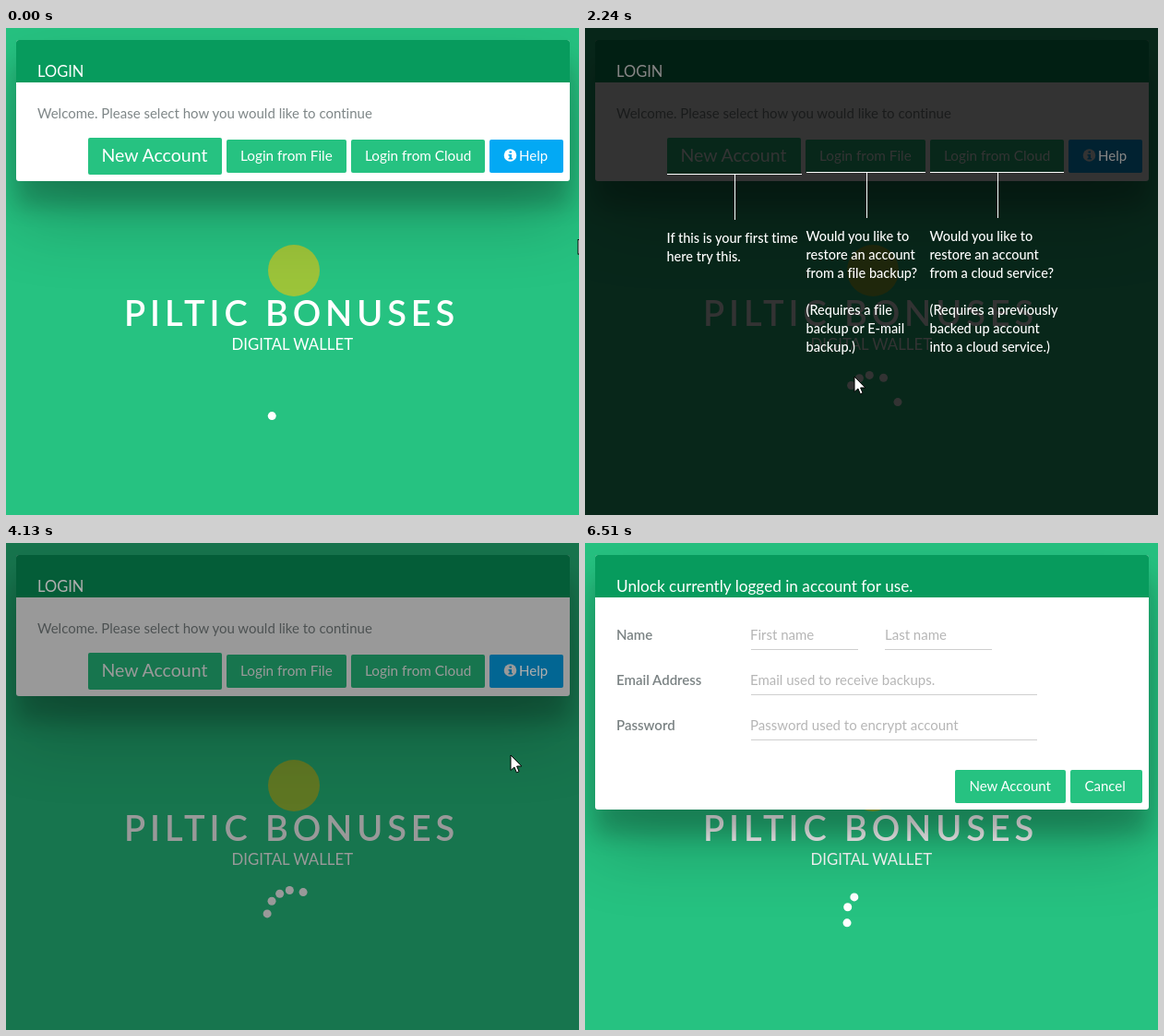
These frames come from a looping animation (621x528 px, 6650 ms). An HTML page:

```html
<!DOCTYPE html>
<html lang="en">
<head>
<meta charset="utf-8">
<title>Digital wallet login</title>
<style>
  html, body { margin: 0; width: 100%; height: 100%; overflow: hidden; background: #26c281; }
  body { position: relative; font: 15px Lato, "Open Sans", sans-serif; font-variant-ligatures: none; }
  svg, #dim { position: absolute; left: 0; top: 0; width: 621px; height: 528px; }
  text { fill: #fff; white-space: pre; }
  .card {
    position: absolute; left: 11px; top: 13px; width: 600px; border-radius: 3px; background: #fff;
    box-shadow: 0 27px 24px rgba(0,0,0,.2), 0 40px 77px rgba(0,0,0,.22);
  }
  .card svg { left: -11px; top: -13px; }
  .head { fill: #079b5d; }
  .btn rect { fill: #26c281; rx: 2px; }
  .btn #help { fill: #03a9f4; }
  .label text { fill: #7a8283; font-weight: 600; }
  .hint text { fill: #b6b6b6; }
  .rule { stroke: #cfcfcf; }
  #dim { background: #000; }
  #tips { font-size: 14.5px; font-weight: 500; }
  #tips path { stroke: #fff; fill: none; }
  .pointer { fill: #fff; stroke: #000; stroke-width: 1; }
</style>
</head>
<body>
<svg>
  <circle cx="312" cy="263" r="28" fill="#9cc43a"/>
  <text x="128" y="323" font-size="38" font-weight="600" letter-spacing="4.9">PILTIC BONUSES</text>
  <text x="244.5" y="349" font-size="16.8">DIGITAL WALLET</text>
  <g id="dots" fill="#fff"></g>
</svg>

<div class="card" id="login" style="height:153px"><svg>
  <path class="head" d="M11 59V16q0-3 3-3H608q3 0 3 3V59Z"/>
  <text x="34" y="53" font-size="16.5">LOGIN</text>
  <text x="34" y="98" style="fill:#7f8788">Welcome. Please select how you would like to continue</text>
  <g class="btn">
    <rect x="89" y="119" width="145" height="40"/><text x="103.5" y="145" font-size="19.5">New Account</text>
    <rect x="239" y="121" width="130" height="36"/><text x="254" y="144" font-size="15.3">Login from File</text>
    <rect x="374" y="121" width="145" height="36"/><text x="389" y="144" font-size="15.3">Login from Cloud</text>
    <rect x="524" y="121" width="80" height="36" id="help"/><text x="556" y="144">Help</text>
  </g>
  <circle cx="546.5" cy="138" r="6.8" fill="#fff"/>
  <path d="M545.5 133.5h2.5v2h-2.5zM544.5 137h3.5v4h1v1.5h-4.5v-1.5h1v-2.5h-1z" fill="#03a9f4"/>
</svg></div>

<div class="card" id="form" style="height:276px"><svg>
  <path class="head" d="M11 59V16q0-3 3-3H608q3 0 3 3V59Z"/>
  <text x="34" y="53" font-size="17.2">Unlock currently logged in account for use.</text>
  <g class="label">
    <text x="34" y="105">Name</text>
    <text x="34" y="154">Email Address</text>
    <text x="34" y="203">Password</text>
  </g>
  <g class="hint">
    <text x="179" y="105">First name</text>
    <text x="325" y="105">Last name</text>
    <text x="179" y="154">Email used to receive backups.</text>
    <text x="179" y="203">Password used to encrypt account</text>
  </g>
  <path class="rule" d="M180 115.5H296M325 115.5H441M180 164.5H490M180 213.5H490"/>
  <g class="btn">
    <rect x="401" y="246" width="120" height="36"/><text x="416.5" y="269">New Account</text>
    <rect x="526" y="246" width="78" height="36"/><text x="541.5" y="269">Cancel</text>
  </g>
</svg></div>

<div id="dim"></div>
<svg id="glow">
  <text x="34" y="53" font-size="16.5">LOGIN</text>
  <text x="556" y="144">Help</text>
</svg>
<svg id="tips">
  <path d="M89 158.5H235M162.5 158V208M240 156.5H369M305.5 156V206M374 156.5H519M447.5 156V206"/>
</svg>
<svg>
  <g id="cursor">
    <path id="arrow" class="pointer" d="M0 0V16.5L3.9 13 6.4 18.8 9 17.7 6.6 12H11.8Z"/>
    <path id="hand" class="pointer" d="M-.5 1.5Q1.5-1 3.5 1.5V8Q5.5 6.5 7 8.5 9 7.5 10 9.5 12.5 9 12.5 12V16Q12.5 19 10.5 21.5V24H1.5V21.5L-4.5 14Q-5.5 11-2.5 11.5L-.5 13.5ZM3.5 8V12.5M7 8.5V12.5M10 9.5V12.5"/>
  </g>
</svg>

<script>
const LOOP = 6650, TICK = 70;
const $ = id => document.getElementById(id);

function add(parent, tag, attrs, text = '') {
  const el = document.createElementNS('http://www.w3.org/2000/svg', tag);
  for (const k in attrs) el.setAttribute(k, attrs[k]);
  el.textContent = text;
  return parent.appendChild(el);
}

const tip = (x, y, text) => text.split('|').forEach((line, i) =>
  add($('tips'), 'text', { x, y: y + 20 * i }, line));
tip(88.5, 233, 'If this is your first time|here try this.');
tip(239.5, 231, 'Would you like to|restore an account|from a file backup?||(Requires a file|backup or E-mail|backup.)');
tip(373.5, 231, 'Would you like to|restore an account|from a cloud service?||(Requires a previously|backed up account|into a cloud service.)');

const dots = [0, 1, 2, 3, 4].map(() => add($('dots'), 'circle', { r: 4.5 }));

const ramp = (t, from, to) => Math.min(1, Math.max(0, (t - from) / (to - from)));

// Linear interpolation over rows of [time, ...values]
function track(rows, t) {
  const i = Math.max(1, rows.findIndex(row => row[0] >= t));
  const a = rows[i - 1], b = rows[i];
  const p = ramp(t, a[0], b[0]);
  return a.slice(1).map((v, k) => v + (b[k + 1] - v) * p);
}

// Each dot makes two turns, fast at the bottom and slow over the top.
// The dots follow one unit apart; the ring runs slower while the page fades.
const TURN = 7.1, RUN = 14.6, CYCLE = 18.4;
const lead = [[0, .45], [1330, 4.8], [2240, 6.45], [3990, 12.2], [4970, 14.1], [5670, 16.7], [LOOP, 22]];

function orbit(n) {
  const turns = Math.min(2, n / TURN), p = turns % 1;
  return Math.PI * (1 + 2 * (Math.floor(turns) + .6 * Math.sqrt(p) + .4 * p ** 8));
}

function drawDot(dot, n) {
  const on = n > 0 && n < RUN;
  dot.style.display = on ? '' : 'none';
  if (!on) return;
  dot.setAttribute('cx', 311 + 28 * Math.sin(orbit(n)));
  dot.setAttribute('cy', 404.3 - 28 * Math.cos(orbit(n)));
}

// In from the right, Help, across the tips, New Account, out at the bottom
const route = [[0, 620, 229], [350, 606, 228], [910, 561, 139], [1610, 561, 139], [1990, 470, 506],
  [2240, 292, 378], [2520, 118, 240], [3150, 366, 240], [3850, 547, 230], [4620, 547, 230],
  [4970, 186.5, 129], [5670, 165, 133], [6200, 452, 540], [LOOP, 452, 540]];

function draw(t) {
  const first = track(lead, t)[0];
  dots.forEach((dot, k) => drawDot(dot, first - k > CYCLE ? first - k - CYCLE : first - k));

  const dim = .8 * (ramp(t, 1050, 1610) - ramp(t, 3850, 4410));
  $('dim').style.opacity = dim;
  $('glow').style.opacity = dim / 2;
  $('tips').style.opacity = ramp(t, 1050, 1260) - ramp(t, 3640, 3850);
  $('login').style.opacity = 1 - ramp(t, 5250, 5530);
  $('form').style.opacity = ramp(t, 5670, 5950);

  const [x, y] = track(route, t);
  const hand = (t >= 770 && t < 1120) || (t >= 4900 && t < 5740);
  $('cursor').setAttribute('transform', `translate(${x} ${y})`);
  $('hand').style.display = hand ? '' : 'none';
  $('arrow').style.display = hand ? 'none' : '';
  $('help').style.filter = t >= 770 && t < 1680 ? 'drop-shadow(0 3px 3px rgba(0,0,0,.35))' : 'none';
}

function loop() {
  draw(Math.floor(performance.now() % LOOP / TICK) * TICK);
  requestAnimationFrame(loop);
}
loop();
</script>
</body>
</html>
```
